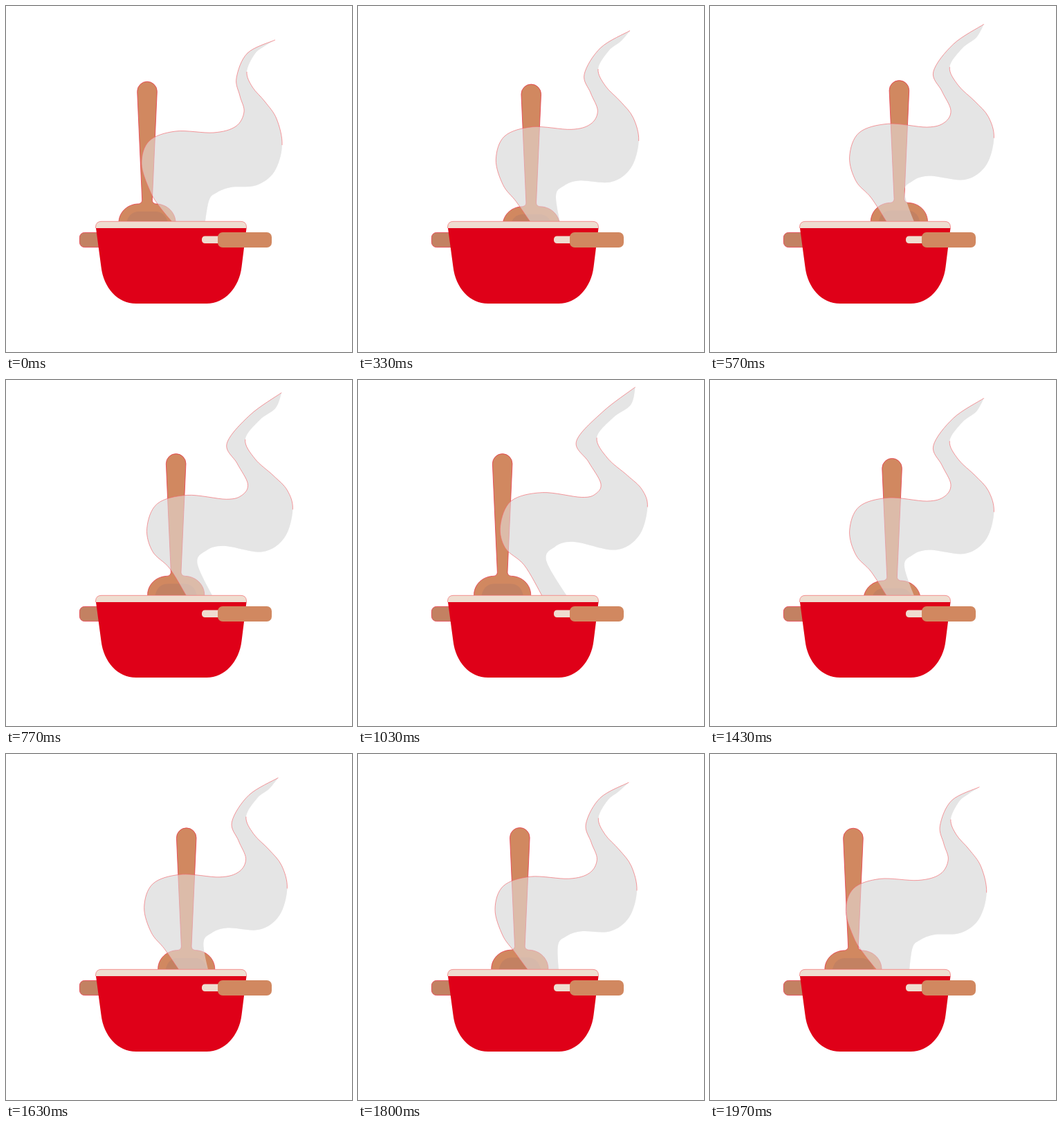
Write an HTML page that moves like this. It is 500 by 500 pixels and loops after 2.01 s.

```html
<!DOCTYPE html>
<html lang="en">
<head>
<meta charset="utf-8">
<title>Stirring pot</title>
<style>
  html, body { margin: 0; width: 100%; height: 100%; overflow: hidden; background: #fff; }
  svg { display: block; width: 100%; height: 100%; }
  .wood { fill: #d18860; }
  .shade { fill: #c38162; }
  .cream { fill: #efddd0; }
  .red { fill: #df0018; }
  .steam { fill: #e6e6e6; }
  .edge { fill: none; stroke: #f4646a; stroke-width: .8; stroke-opacity: .8; }
  .rim { stroke: #e8384a; stroke-width: .8; }
</style>
</head>
<body>
<svg viewBox="0 0 500 500">
  <rect class="shade rim" x="106.4" y="327.4" width="40" height="21.2" rx="7"/>
  <!-- Steam lies behind the spoon and, half clear, in front of it. -->
  <path class="steam"/>
  <g id="spoon">
    <path class="wood rim" d="M-14.3 14.5A14.3 14.3 0 0 1 14.3 14.5L7.3 171C7.3 175 10 177 14 177C30 178 40.5 190 41 203V226H-41V203C-40.5 190 -30 178 -14 177C-10 177 -7.3 175 -7.3 171Z"/>
    <path class="shade" d="M-30 204C-27 193 -21 188 -12 188H12C21 188 27 193 30 204V218H-30Z"/>
  </g>
  <path class="steam" fill-opacity=".55"/>
  <path id="steamEdge" class="edge"/>
  <path class="cream" d="M129.5 321V319Q130 311 138 311H339Q347 311 347.5 319V321Z"/>
  <path class="edge" d="M129.5 321V319Q130 311.3 138 311.3H339Q347 311.3 347.5 319V321"/>
  <path class="red" d="M130 321L137.5 377C141 407 161 430 188 430H290C316 430 337 407 340.5 377L347.5 321Z"/>
  <rect class="cream" x="283" y="332.5" width="32" height="10.5" rx="4.5"/>
  <rect class="wood" x="306" y="327" width="78" height="22" rx="7"/>
</svg>
<script>
const LOOP = 2010, STEP = 100 / 3, LAST = 59;

// Key points of the steam: x, y at rest, then x, y fully risen.
const leftSide = [
  [389, 49, 401, 9], [349, 68, 354, 45], [333, 104, 315, 88],
  [338, 130, 333, 118], [344, 153, 351, 149], [332, 174, 344, 164],
  [300, 183, 324, 169], [245, 181, 267, 162], [207, 195, 222, 174],
  [196, 228, 206, 210], [208, 267, 213, 242], [222, 290, 241, 267],
  [240, 312, 267, 312]
];
const rightSide = [
  [286, 326, 312, 326], [293, 282, 272, 262], [304, 270, 284, 240],
  [325, 262, 312, 233], [362, 259, 373, 245], [388, 239, 407, 224],
  [399, 201, 419, 183], [391, 163, 411, 158], [374, 138, 390, 138],
  [356, 117, 361, 113], [348, 95, 345, 83], [359, 70, 369, 54],
  [372, 59, 395, 35], [389, 49, 401, 9]
];

const mix = (a, b, k) => a + (b - a) * k;
const pose = (side, k) => side.map(([x, y, u, v]) => [mix(x, u, k), mix(y, v, k)]);

// Smooth curve through points from..to, shaped by their neighbours.
function spline(p, from = 0, to = p.length - 1) {
  const at = i => p[Math.max(0, Math.min(p.length - 1, i))];
  const lean = (i, sign) => at(i).map((v, j) => v + sign * (at(i + 1)[j] - at(i - 1)[j]) / 6);
  let d = `${at(from)}`;
  for (let i = from; i < to; i++) d += `C${lean(i, 1)} ${lean(i + 1, -1)} ${at(i + 1)}`;
  return d;
}

// Steady sweep right along the bottom and back along the top; the second lap is faster.
function spoonAt(t) {
  const first = 1067, second = 918;
  const lap = t < first ? t / first : (t - first) / second;
  const across = 1 - Math.abs(1 - 2 * lap);
  const dip = Math.tanh(6 * Math.sin(2 * Math.PI * lap));
  return [204 + 74 * across, 109 + 3.2 * dip + 1.1 * across];
}

const steam = document.querySelectorAll('.steam');
const steamEdge = document.getElementById('steamEdge');
const spoon = document.getElementById('spoon');

function draw(ms) {
  // The picture advances at 30 steps a second.
  const t = Math.min(LAST, Math.floor((ms % LOOP + 3.4) / STEP)) * STEP;
  const rise = 1 - Math.abs(t - 1000) / 1000;
  const left = pose(leftSide, rise), right = pose(rightSide, rise);
  for (const s of steam) s.setAttribute('d', `M${spline(left)}L${spline(right)}Z`);
  steamEdge.setAttribute('d', `M${spline(left)}M${spline(right, 6, 10)}`);
  spoon.setAttribute('transform', `translate(${spoonAt(t)})`);
}

const start = performance.now();
function tick() {
  draw(performance.now() - start);
  requestAnimationFrame(tick);
}
tick();
</script>
</body>
</html>
```
